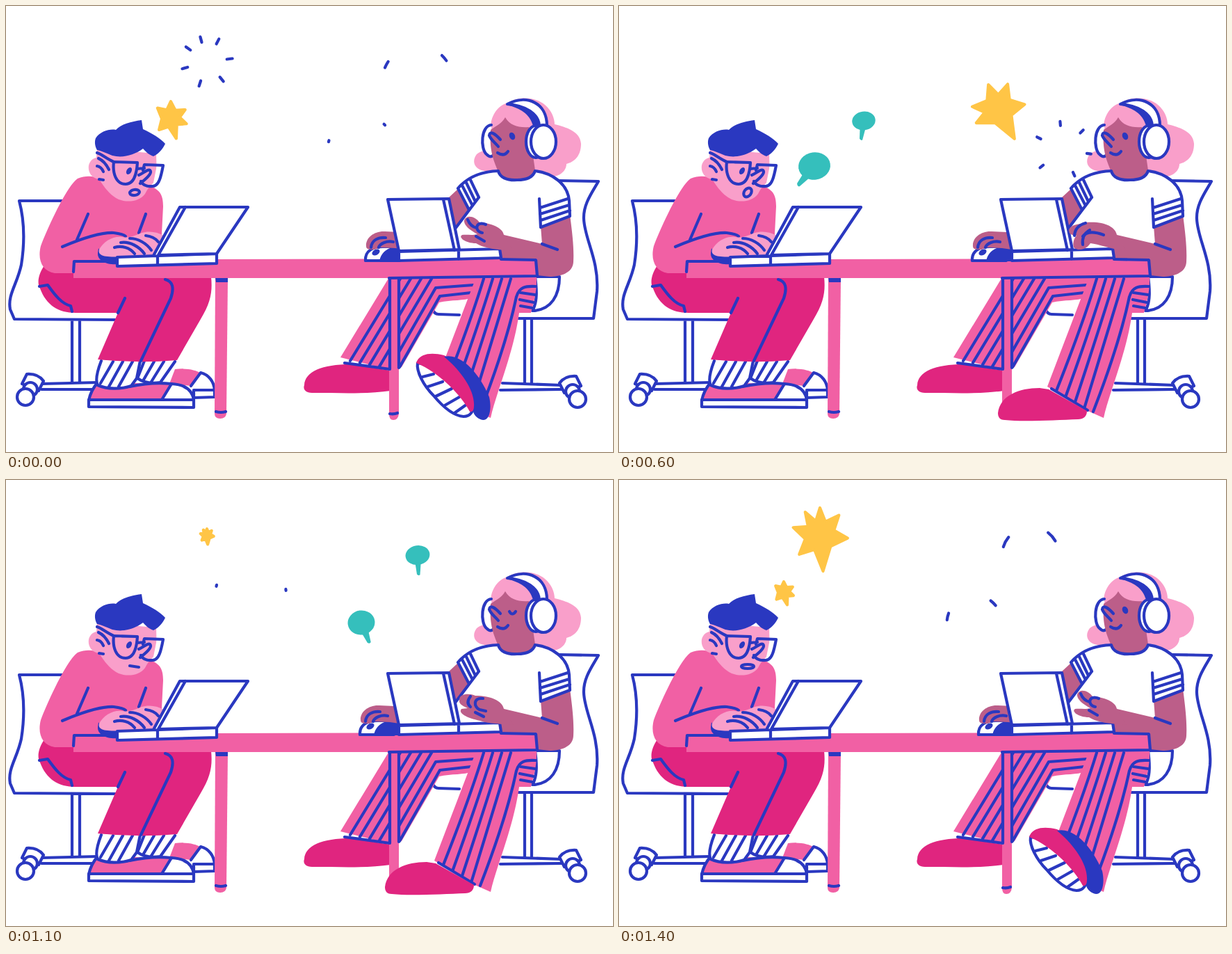
Animation, 873 px wide and 641 px high, one loop 1500 ms. Source, as an HTML page:

```html
<!DOCTYPE html>
<html lang="en">
<head>
<meta charset="utf-8">
<title>Desk mates</title>
<style>
html, body { margin: 0; width: 100%; height: 100%; overflow: hidden; background: #fff; }
svg { display: block; width: 873px; height: 641px; fill: none; stroke: #2a38c0; stroke-width: 4.2; stroke-linecap: round; stroke-linejoin: round; }
.w { fill: #fff; }
.b, .p, .h, .s, .k, .t { stroke: none; }
.b { fill: #2a38c0; }
.p { fill: #f160a4; }
.h { fill: #e0257f; }
.s { fill: #f99fca; }
.k { fill: #bc5e89; }
.y { fill: #ffc546; stroke: #ffc546; }
.t { fill: #35bfbc; }
</style>
</head>
<body>
<svg viewBox="0 0 873 641">
  <!-- chairs -->
  <path d="M82 280H19C27 310 27 340 22 372C16 400 2 415 6 436L12 450L160 451M95 452V541M106 452V541M51 543L132 541M51 551L125 551"/>
  <path d="M795 251L852 252C843 268 830 285 831 306C832 335 853 365 850 410L845 449H735M746 451V541M756 451V541M714 542L799 545M711 552L799 551M613 435Q616 443 622 443L652 444"/>
  <g id="wheel">
    <path class="w" d="M23 543L30 529Q46 528 54 539L47 553Z"/>
    <circle class="w" cx="35" cy="551" r="10"/><circle class="w" cx="28" cy="562" r="12"/>
  </g>
  <use href="#wheel" transform="matrix(-1 0 0 1 850 3)"/>

  <!-- left sitter: legs and shoes -->
  <path class="p" d="M243 522C260 520 273 523 281 528L266 546L235 543Z"/>
  <path class="w" d="M266 546L280 527C292 530 299 540 300 552V562L270 563V552H299"/>
  <path class="p" d="M132 541C125 545 120 556 119 567H226L239 543Z"/>
  <path d="M119 567Q122 552 132 541M178 547Q210 540 238 543"/>
  <path class="w" d="M224 566L238 543C258 544 268 553 270 566Z"/>
  <path class="w" d="M119 566H270V577L119 576Z"/>
  <path class="w" d="M199 510L189 535C200 543 215 542 222 541L243 511M209 540L227 511M198 537L213 511"/>
  <path class="w" d="M137 510C130 528 129 540 132 545C145 551 165 551 180 546L188 535L193 510M136 542L154 511M148 547L168 511M162 547L182 511"/>
  <path class="h" d="M55 373C47 385 44 398 49 406C58 430 75 441 100 441H161L132 508Q190 514 246 509L280 450C295 425 297 410 295 389L97 380Z"/>
  <path d="M48 403L60 401C70 415 80 428 93 431L95 439M171 420L161 441M229 393C240 396 242 405 237 420L194 510"/>

  <!-- left sitter: torso and head -->
  <path class="p" d="M103 248C116 243 128 244 135 250L180 270L208 259C222 265 226 272 226 288L222 366H97V384H70C52 381 45 365 50 345C60 318 88 258 103 248Z"/>
  <path class="s" d="M131 205L216 212L217 250C208 257 204 262 200 270C192 281 175 283 162 278C150 272 142 262 134 249C116 247 113 222 130 218Z"/>
  <path class="b" d="M129 190C135 180 150 176 158 178C165 170 180 166 195 164L197 177C210 183 222 190 229 198C225 206 220 212 212 216C205 214 200 208 197 205C185 214 168 219 153 215C143 211 134 207 131 207C128 202 127 195 129 190Z"/>
  <path d="M131 211C138 213 145 220 155 224M133 219Q142 223 148 235M131 230Q137 231 140 238M134 249L140 250"/>
  <path class="w" d="M217 229L226 229C224 245 220 258 211 259Z" stroke="none"/>
  <path d="M155 224L189 225C188 241 184 256 172 256C158 256 153 240 155 224ZM189 234L199 233M197 236L199 228L226 229C223 245 220 259 211 259C201 260 196 256 194 252M191 243C198 240 204 234 207 236C211 240 202 248 193 255"/>
  <path d="M81 346C100 338 135 325 155 326C163 327 170 329 172 331M118 299L102 336M201 299L191 326"/>
  <g id="leftFace"></g>

  <!-- right sitter: head -->
  <path class="s" d="M697 182C695 155 710 142 722 139C738 129 762 131 775 142C785 150 789 162 789 170C805 174 826 180 827 198C827 215 818 224 806 227C806 240 790 248 780 244L700 242L688 237C672 234 670 222 677 213C683 208 690 207 697 209Z"/>
  <path class="w" d="M698 171C683 172 682 205 691 213C695 217 698 217 700 215"/>
  <path class="k" d="M697 178C705 172 712 170 718 160C725 172 737 175 752 174L761 236C758 250 745 251 735 251C720 251 712 247 708 238C700 220 695 205 697 178Z"/>
  <path class="w" d="M721 141C750 126 778 140 778 172L767 172C766 155 748 143 721 141Z"/>
  <path class="b" d="M720 142C750 140 766 155 768 172L758 172C753 155 740 147 720 142Z"/>
  <ellipse class="w" cx="762" cy="195" rx="14" ry="23"/><ellipse class="w" cx="773" cy="195" rx="18" ry="24"/>
  <path d="M711 192C703 183 696 179 695 186C697 192 703 196 708 202M707 211Q716 217 722 209"/>
  <g id="rightEye"></g>

  <!-- right sitter: body -->
  <path class="w" d="M757 438C765 425 763 405 761 389H796C796 415 785 437 757 438Z"/>
  <path class="k" d="M650 263L636 276L646 320L680 275Z"/>
  <path class="w" d="M650 262C662 248 680 238 708 237C710 246 720 251 735 250C748 250 758 246 761 237C785 240 808 255 810 280L790 366H640L646 320L680 275L666 293Z" stroke="none"/>
  <path class="k" d="M769 316L811 300C815 330 817 350 816 368C815 385 795 389 782 389L755 386V366H712V328L771 342Z"/>
  <path class="w" d="M767 277L769 318L811 302Q812 270 797 252" stroke="none"/>
  <path d="M646 320L680 275M650 262C662 248 680 238 708 237C710 246 720 251 735 250C748 250 758 246 761 237C785 240 808 255 810 280L811 302L769 318L767 277M768 290L808 277M768 299L810 286M769 308L811 294M650 262L666 293M656 258L671 287M662 254L675 281M668 250L680 275M771 342L793 350"/>

  <!-- right sitter: legs, with the table -->
  <path class="h" d="M429 545C430 525 455 515 495 515L553 524V553C520 558 480 556 440 556C430 556 427 550 429 545Z"/>
  <path class="p" d="M551 390L481 505L552 523L569 519L623 426C640 422 660 424 670 419L690 390Z"/>
  <path d="M487 513L552 522M672 401L618 405L552 520M669 412L624 417L566 519"/>
  <g id="backStripes"></g>
  <path class="p" d="M301 391H319L317 586Q316 593 308 593Q300 593 300 586Z"/>
  <path class="b" d="M301 390H319V397H302Z"/>
  <path class="p" d="M551 391H565V586Q564 595 557 595Q551 595 551 586Z"/>
  <path d="M302 583Q309 585 316 583M552 586Q558 587 563 585M552 391V522M565 391V520"/>
  <path class="p" d="M676 390L616 547L672 581L697 592C705 555 730 500 738 441H755C758 430 764 410 763 390Z"/>
  <g id="frontStripes"></g>
  <path d="M762 403C747 402 738 404 734 418Q720 485 682 583M761 415L740 412M759 426L739 422M757 434L740 431"/>
  <g id="foot"></g>
  <path class="p" d="M97 367L302 364L764 363V388L551 391H97Z"/>
  <path d="M97 382L98 367H162M551 391L764 388L762 365L712 364"/>

  <!-- laptops and hands -->
  <path class="b" d="M133 348C136 357 148 360 165 360L163 371C145 373 131 366 132 355Z"/>
  <path class="s" d="M134 350C140 338 155 330 167 332C177 334 185 330 195 326C205 323 217 324 229 331L216 359C190 360 150 362 140 359C134 357 133 354 134 350Z"/>
  <g id="typing"></g>
  <path class="w" d="M160 361L303 356V370L160 374ZM218 359V372"/>
  <path class="w" d="M213 357L250 289H348L303 356L219 358M258 289L219 358"/>
  <g id="mouse"></g>
  <path class="w" d="M565 353L710 349L712 362L565 366ZM651 351V364"/>
  <path class="w" d="M549 278L637 277L652 350L565 352ZM629 278L645 351"/>
  <g id="hand"></g>
  <g id="effects"></g>
</svg>
<script>
const $ = id => document.getElementById(id);
const line = d => `<path d="${d}"/>`;
const shape = (cls, d) => `<path class="${cls}" d="${d}"/>`;
const oval = (cls, x, y, rx, ry, turn = 0) =>
  `<ellipse class="${cls}" cx="${x}" cy="${y}" rx="${rx}" ry="${ry}" transform="rotate(${turn} ${x} ${y})"/>`;
const at = (x, y, r, deg) => {
  const a = deg * Math.PI / 180;
  return `${(x + r * Math.cos(a)).toFixed(1)} ${(y + r * Math.sin(a)).toFixed(1)}`;
};
const repeat = (n, draw) => Array.from({ length: n }, (_, i) => draw(i)).join('');

$('backStripes').innerHTML = repeat(4, i =>
  line(`M${495 + 14 * i} ${510 + 2.7 * i}L${567 + 15 * i} 392`));
$('frontStripes').innerHTML = line('M622 550L674 581') + repeat(4, i =>
  line(`M${687 + 13 * i} 392Q${666 + 13 * i} 460 ${629 + 13.5 * i} ${553 + 8 * i}`));

const feet = [
  shape('w', 'M592 513C590 525 600 545 615 560C630 578 645 589 658 590C668 590 673 582 673 570L630 520Z') +
  line('M599 533L615 529M607 547L628 540M618 561L641 550M631 574L652 562M645 585L662 573') +
  shape('h', 'M590 513C594 500 610 497 630 502C654 513 674 545 675 572C674 580 671 584 667 583C655 560 625 528 590 513Z') +
  shape('b', 'M630 504C655 498 682 530 695 562C699 580 695 595 687 595C680 595 672 588 672 582C679 555 652 522 630 504Z'),
  shape('w', 'M570 535C570 545 590 555 610 568C630 580 655 589 667 587C675 586 674 580 668 575Z') +
  line('M586 552L591 545M598 560L604 553M611 568L617 560M625 575L631 567M639 581L645 573M653 586L658 578') +
  shape('h', 'M568 537C571 518 595 516 622 526C650 537 681 560 681 576C680 587 668 586 650 578C620 570 595 548 568 537Z') +
  shape('b', 'M621 525C650 524 687 553 697 580C697 592 691 596 684 594C677 592 672 588 674 585C690 570 650 540 621 525Z'),
  shape('h', 'M545 585C548 560 575 549 605 549L618 551L673 582C673 590 668 594 660 594C630 595 580 598 555 595C547 595 545 590 545 585Z')
];

const hands = [
  ['M659 308C663 299 675 303 681 311C697 312 714 318 716 329L730 352C700 350 685 347 676 341C660 341 650 332 656 329C663 328 670 330 678 328C667 322 658 315 659 308Z',
   'M664 307Q668 317 677 319M690 314C675 308 673 324 685 326M676 331L688 338'],
  ['M652 316C652 307 666 306 675 310C696 310 714 317 716 329L730 352C700 350 690 349 682 346C662 342 650 335 655 329L664 328C655 324 651 321 652 316Z',
   'M668 311Q661 320 668 326M686 314C671 312 673 327 681 330L690 332M675 334L687 340'],
  ['M649 331C650 318 665 312 685 314C705 315 716 322 716 329L730 352C700 349 690 343 680 342C672 350 658 350 652 342Q649 338 649 331Z',
   'M664 317C653 326 659 337 667 339M682 315C671 322 673 334 684 334L706 331M667 339Q676 343 680 335'],
  ['M647 322C650 313 663 314 672 311C697 309 714 317 716 329L730 352C705 349 690 342 678 341C672 350 661 353 654 347C652 340 655 333 658 330Q647 330 647 322Z',
   'M671 312Q656 316 655 330M677 322Q665 329 667 343M667 331Q675 321 697 329']
];

const mouths = [
  oval('', 185, 268, 7, 4, -8), oval('', 185, 268, 5, 7, 35),
  oval('', 185, 268, 9, 3), line('M178 267L191 269')
];
const fingers = [
  'M156 347C166 344 178 347 185 356M165 340C178 338 192 346 199 356M178 334C190 334 202 341 209 351M201 330C210 331 216 335 219 339',
  'M160 346C168 343 180 346 185 355M176 336C188 336 200 344 205 354M190 332C203 333 210 342 215 350M150 353Q163 346 176 356'
];

// One character per step of 100 ms
const footAt = '011222222222110';
const handAt = '011222333221100';
const mouthAt = '011111112223332';
const mouseAt = [0, 0, 0, 0, 0, -4, -9, -14, -19, -24, -16, -8, 0, 0, 0];

// Stars: birth step, centre, final size, point angles (tail first), burst radius, ray angles
const stars = [
  { born: 11, x: 289, y: 80, size: 42, points: [85, 138, 197, 238, 270, 313, 365], reach: 47, rays: [-105, -62, -7, 50, 108, 164, -145] },
  { born: 13, x: 237, y: 161, size: 35, points: [75, 135, 217, 270, 330, 380], reach: 40, rays: [180, -118, -55] },
  { born: 1, x: 638, y: 207, size: 38, points: [100, 183, 245, 293, 329, 383], reach: 45, rays: [-153, -95, -44, 8, 65, 142] },
  { born: 3, x: 546, y: 148, size: 40, points: [62, 148, 185, 247, 290, 350], reach: 41, rays: [-163, -94, -40, 18, 81, 133] }
];
// Speech bubbles pop into two arcs
const bubbles = [
  { born: 3, x: 281, y: 230, size: 23, tail: 130, reach: 38, arcs: [-102, 27] },
  { born: 5, x: 352, y: 165, size: 24, tail: 98, reach: 51, arcs: [-165, -8] },
  { born: 9, x: 511, y: 205, size: 25, tail: 68, reach: 48, arcs: [193, -46] },
  { born: 10, x: 592, y: 108, size: 25, tail: 87, reach: 62, arcs: [-152, -41] }
];

function drawStar({ x, y, size, points, reach, rays }, age) {
  if (age > 3) {
    const r = reach * [.7, .85, 1][age - 4], half = [4, 3, .7][age - 4];
    return rays.map(a => line(`M${at(x, y, r - half, a)}L${at(x, y, r + half, a)}`)).join('');
  }
  const r = size * [.28, .48, .74, 1][age] - 2;
  const corners = points.map((a, i) => {
    const next = i + 1 < points.length ? points[i + 1] : points[0] + 360;
    return at(x, y, r * (i ? 1 : 1.28), a) + 'L' + at(x, y, r * .54, (a + next) / 2);
  });
  return shape('y', 'M' + corners.join('L') + 'Z');
}

function drawBubble({ born, x, y, size, tail, reach, arcs }, age) {
  if (age > 3) {
    const r = reach * [.66, .82, 1][age - 4], half = [8, 5, 1][age - 4] / r * 57;
    return arcs.map(a => line(`M${at(x, y, r, a - half)}A${r} ${r} 0 0 1 ${at(x, y, r, a + half)}`)).join('');
  }
  if (born === 3 && age < 2)
    return age ? shape('t', 'M265 233C256 232 247 240 249 255C256 256 254 248 260 246Q267 240 265 233Z') : '';
  const rx = size * [.6, .7, .78, 1][age], ry = rx * [.58, .8, .9, .86][age];
  const cy = age ? y : y + 12;
  return oval('t', x, cy, rx, ry, -8) +
    shape('t', `M${at(x, cy, ry * .8, tail - 22)}L${at(x, cy, rx * 1.4 + 4, tail - 4)}Q${at(x, cy, rx * 1.5 + 4, tail)} ${at(x, cy, rx * 1.4 + 3, tail + 5)}L${at(x, cy, ry * .8, tail + 22)}Z`);
}

const alive = (list, draw, step) => list.map(item => {
  const age = (step - item.born + 15) % 15;
  return age < 7 ? draw(item, age) : '';
}).join('');

function clickMarks(step) {
  if (step === 8 || step === 9) return line('M470 342L483 343L480 328L492 329L489 314L503 319L505 310');
  if (step !== 7 && step !== 10) return '';
  return [[480, 342], [489, 328], [503, 318]].map(([x, y]) => line(`M${x - 1} ${y}l2 -1`)).join('');
}

function render(step) {
  $('leftFace').innerHTML = mouths[mouthAt[step]] +
    (step === 4 || step === 5 ? line('M170 239Q175 247 180 239') : oval('b', 177, 237, 3.5, 5.5, 30));
  $('rightEye').innerHTML = step === 11 || step === 12
    ? line('M724 189Q728 196 733 189') : oval('b', 728, 187, 4, 5.5, -25);
  $('foot').innerHTML = feet[footAt[step]];
  $('typing').innerHTML = line(fingers[+(step > 7 && step < 11)]);
  const [skin, knuckles] = hands[handAt[step]];
  $('hand').innerHTML = shape('k', skin) + line(knuckles);
  $('mouse').innerHTML = `<g transform="translate(${mouseAt[step]})">` +
    shape('w', 'M517 366C516 352 528 345 545 346H566V366Z') +
    shape('b', 'M537 367C540 350 555 345 566 346H588V367Z') + oval('b', 532, 354, 6, 4, -30) +
    shape('k', 'M518 345C517 333 530 323 545 324L588 326V352L560 348L538 347L530 350C520 350 518 349 518 345Z') +
    line('M525 347C526 336 536 332 546 333M536 347C538 341 548 337 557 339') + '</g>' + clickMarks(step);
  $('effects').innerHTML = alive(stars, drawStar, step) + alive(bubbles, drawBubble, step);
}

let shown = -1;
function tick() {
  const step = Math.floor(performance.now() % 1500 / 100);
  if (step !== shown) render(shown = step);
  requestAnimationFrame(tick);
}
tick();
</script>
</body>
</html>
```
